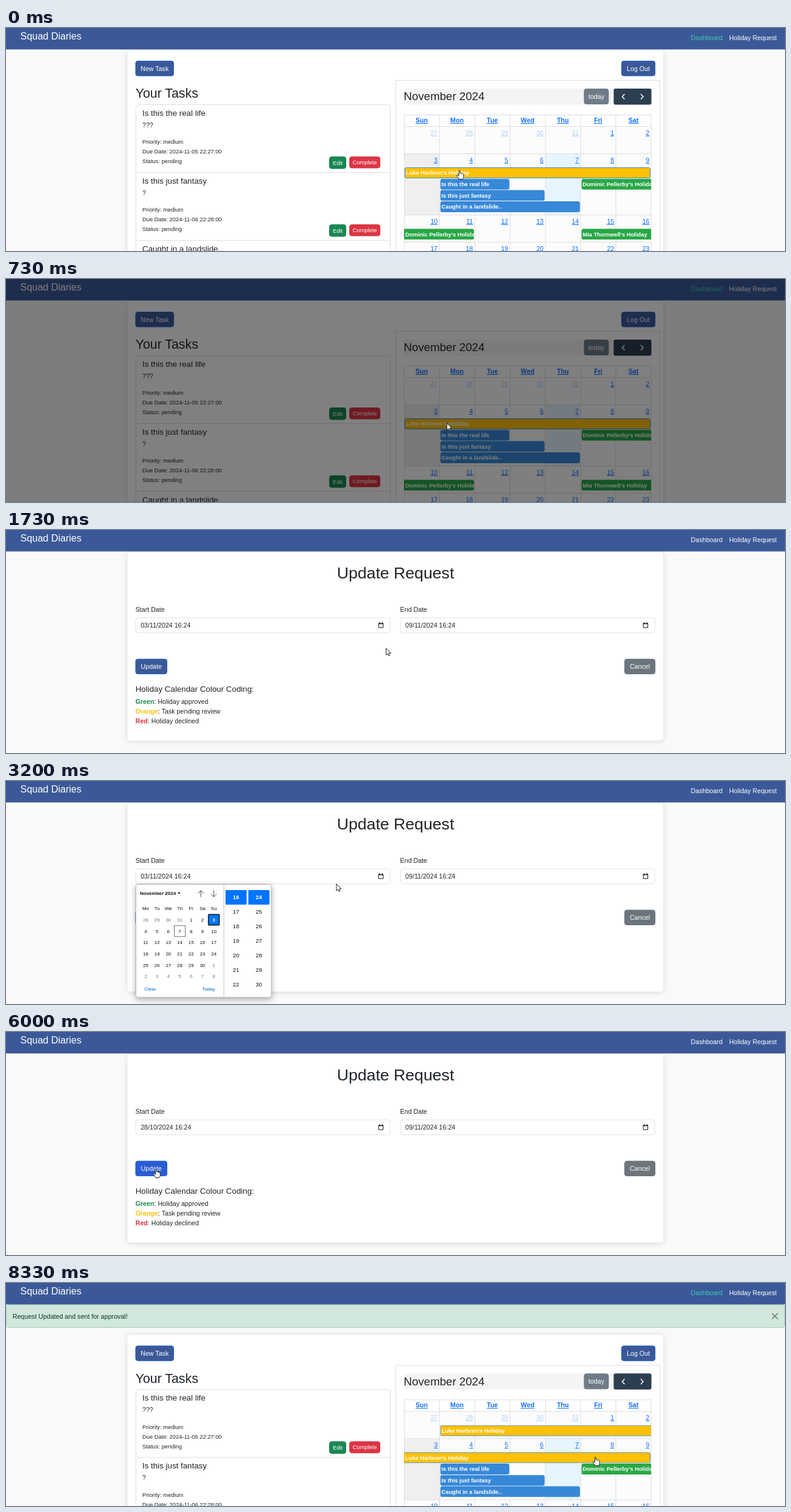
These frames come from a looping animation (1280x368 px, 9.4 s). An HTML page:

```html
<!DOCTYPE html>
<html lang="en">
<head>
<meta charset="utf-8">
<title>Holiday request</title>
<style>
html, body { margin: 0; width: 100%; height: 100%; overflow: hidden; background: #f9f9f9; }
svg { display: block; }
text { font-family: "Liberation Sans", Arial, sans-serif; white-space: pre; }
.b { font-weight: bold; }
.u { text-decoration: underline; }
.m { text-anchor: middle; }
.e { text-anchor: end; }
.card { filter: drop-shadow(0 1px 4px rgba(0, 0, 0, .14)); }
.pop { filter: drop-shadow(0 3px 5px rgba(0, 0, 0, .32)); }
</style>
</head>
<body>
<svg id="stage" width="100%" height="100%" viewBox="0 0 1280 368"></svg>
<script>
const LOOP = 9400, STEP = 200 / 3, SHIFT = 49.33;
const INK = '#212529', LINK = '#0d6efd', NAVY = '#3b5998';
const PEOPLE = ['Luke Harbren', 'Dominic Pellerby', 'Mia Thornwell'].map(n => n + "'s Holiday");
const TASKS = ['Is this the real life', 'Is this just fantasy', 'Caught in a landslide..'];

const text = (x, y, s, size = 10.67, fill = INK, cls = '', more = '') =>
  `<text x="${x}" y="${y}" font-size="${size}" fill="${fill}" class="${cls}" ${more}>${s}</text>`;
const rect = (x, y, w, h, fill, r = 0, more = '') =>
  `<rect x="${x}" y="${y}" width="${w}" height="${h}" rx="${r}" fill="${fill}" ${more}/>`;
const path = (d, stroke, width = 1, fill = 'none', more = '') =>
  `<path d="${d}" stroke="${stroke}" stroke-width="${width}" fill="${fill}" ${more}/>`;
const group = (id, body, more = '') => `<g id="${id}" ${more}>${body}</g>`;
const range = n => [...Array(n).keys()];

const button = (x, y, w, h, fill, label, size = 10.67, edge = fill, id = '') =>
  rect(x + .5, y + .5, w - 1, h - 1, fill, 3.5, `stroke="${edge}" ${id && `id="${id}"`}`) +
  text(x + w / 2, y + h / 2 + size * .36, label, size, '#fff', 'm');

// Calendar bar; open ends run past the clipped box so they stay square.
function bar(x1, x2, mid, fill, label, open = '', edge = fill) {
  const l = open.includes('l') ? -6 : .5, r = x2 - x1 + (open.includes('r') ? 6 : -.5);
  return `<svg x="${x1}" y="${mid - 9}" width="${x2 - x1}" height="18">` +
    rect(l, .5, r - l, 17, fill, 2.5, `stroke="${edge}"`) +
    text(2, 12.3, label, 9.33, '#fff', 'b') + '</svg>';
}

function task(title, i) {
  const y = 126.5 + i * 112;
  return path(`M213.5 ${y + 112}H631`, '#dedede') +
    text(224, y + 18.2, title, 13.33) +
    text(224, y + 37.6, i ? '?' : '???') +
    text(224, y + 64.8, 'Priority: medium', 9.33) +
    text(224, y + 80.8, `Due Date: 2024-11-0${5 + i} 22:2${7 + i}:00`, 9.33) +
    text(224, y + 96.8, 'Status: pending', 9.33) +
    button(531, y + 85.5, 28, 20.5, '#198754', 'Edit', 9.33) +
    button(564, y + 85.5, 51, 19.5, '#dc3545', 'Complete', 9.33);
}

function calendar() {
  const rows = [162.5, 207.5, 308.5, 353.5, 398.5];
  let s = rect(654, 163, 406, 240, '#fcfcfc') +
    rect(654, 208, 58, 100, '#efefef') + rect(886, 208, 58, 100, '#e6f5ff');
  s += path([143.5, ...rows].map(y => `M654 ${y}H1060`).join('') +
    range(8).map(i => `M${654.5 + i * 57.93} 143V420`).join(''), '#ddd');
  'Sun Mon Tue Wed Thu Fri Sat'.split(' ').forEach((d, i) =>
    s += text(683 + i * 58, 156, d, 10.67, LINK, 'b u m'));
  range(28).forEach(i => s += text(709.3 + i % 7 * 58, rows[i / 7 | 0] + 14.3,
    i < 5 ? 27 + i : i - 4, 10.67, LINK, 'u e', i < 5 ? 'opacity=".3"' : ''));
  const blue = '#3788d8', green = '#28a745', gold = '#ffc107';
  s += group('before', bar(655, 1059, 239, gold, PEOPLE[0], '', blue));
  s += group('after', bar(713.5, 1060, 194.3, gold, PEOPLE[0], 'r', blue) +
    bar(654, 1059, 239, gold, PEOPLE[0], 'l', blue));
  TASKS.forEach((t, i) => s += bar(713.5, 827 + i * 58, 257.7 + i * 18.67, blue, t));
  return s + bar(945.5, 1060, 257.7, green, PEOPLE[1], 'r') +
    bar(654, 769, 340.3, green, PEOPLE[1], 'l') +
    bar(945.5, 1060, 340.3, green, PEOPLE[2], 'r');
}

const dashboard = () =>
  rect(199.5, 36, 880.5, 420, '#fff', 5, 'class="card"') +
  button(212.5, 54, 63.5, 25.5, NAVY, 'New Task', 10.67, '#2064cf') +
  button(1011, 54, 56, 25.5, NAVY, 'Log Out', 10.67, '#2064cf') +
  text(212.7, 115.2, 'Your Tasks', 21.33) +
  rect(213.5, 126.5, 418, 400, '#fff', 4, 'stroke="#dedede"') +
  TASKS.map(task).join('') +
  rect(640.5, 86.5, 434, 400, '#fff', 0, 'stroke="#ddd"') +
  rect(654, 100, 406, 26.5, '#f4f4f4') +
  text(653.6, 119.4, 'November 2024', 18.67) +
  button(949.5, 100, 41, 26, '#6f7c88', 'today') +
  rect(998.5, 100, 62, 26.5, '#2c3e50', 3) +
  path('M1016.5 109l-4 4.3 4 4.3M1043 109l4 4.3-4 4.3', '#fff', 1.5) +
  calendar();

const field = (x, label, value, id) =>
  text(x, 134.8, label) +
  rect(x + .5, 145, 418, 24.7, '#fff', 4, 'stroke="#dee2e6"') +
  text(x + 8.5, 160.8, value, 10.67, INK, '', `id="${id}"`) +
  path(`M${x + 399.6} 154.5h7.4v6.6h-7.4z`, '#111', 1) +
  path(`M${x + 399.2} 154.6h8.2M${x + 401} 152.4v2M${x + 405.6} 152.4v2`, '#111', 1.5);

const legend = (y, name, fill, note) =>
  text(212.7, y, `<tspan class="b" fill="${fill}">${name}</tspan>: ${note}`);

// Month grid with weeks from Monday; lead = days shown from the month before.
function month(id, name, tipX, lead, prevLen, len, chosen, todayCell) {
  let s = text(220, 188, name, 8, '#101010', 'b') +
    path(`M${tipX} 184h4.6l-2.3 2.8z`, 'none', 0, '#101010');
  range(42).forEach(i => {
    const n = i - lead + 1, out = n < 1 || n > len;
    const x = 229.5 + i % 7 * 18.67, y = 229 + (i / 7 | 0) * 18.67, on = n === chosen;
    if (on) s += rect(x - 9, y - 8.8, 18, 17.6, '#0075ff', 1, 'stroke="#101010" stroke-width="1.4"');
    if (i === todayCell) s += rect(x - 9, y - 9, 18, 18, 'none', 0, 'stroke="#767676"');
    s += text(x, y + 2.9, n < 1 ? n + prevLen : out ? n - len : n, 8,
      on ? '#fff' : out ? '#757575' : '#101010', on ? 'm b' : 'm');
  });
  return group(id, s);
}

function picker() {
  let s = rect(213.5, 170.5, 222.5, 186.5, '#fff', 3, 'class="pop" stroke="#b5b5b5"') +
    path('M358 171V357', '#bfbfbf') +
    path('M320.2 191.5V181M315.5 185.6l4.7-4.7 4.7 4.7M341.4 180.5V191M336.7 186.4l4.7 4.7 4.7-4.7', '#333', .9);
  'Mo Tu We Th Fr Sa Su'.split(' ').forEach((d, i) =>
    s += text(229.5 + i * 18.67, 212.9, d, 8, '#101010', 'm'));
  s += text(227.5, 345.9, 'Clear', 8, '#0069d6') + text(343.5, 345.9, 'Today', 8, '#0069d6', 'e');
  [[378, 16], [415.5, 24]].forEach(([x, first]) => {
    s += rect(x - 17.3, 180, 34.7, 24, '#0075ff', 1);
    range(7).forEach(i => s += text(x, 195.4 + i * 24, first + i, 9.33,
      i ? '#101010' : '#fff', i ? 'm' : 'm b'));
  });
  return s + month('nov', 'November 2024', 282, 4, 31, 30, 3, 10) +
    month('oct', 'October 2024', 273.5, 1, 30, 31, 28, 38);
}

const form = () =>
  rect(199.5, 36, 880.5, 311.5, '#fff', 5, 'class="card"') +
  text(640, 79.5, 'Update Request', 26.67, INK, 'm') +
  field(212.7, 'Start Date', '', 'start') +
  field(647.6, 'End Date', '09/11/2024 16:24', 'end') +
  button(212.5, 212.5, 52.5, 25.5, NAVY, 'Update', 10.67, '#2064cf', 'update') +
  button(1016, 212.5, 51, 25.5, '#6c757d', 'Cancel') +
  text(212.7, 266.6, 'Holiday Calendar Colour Coding:', 13.33) +
  legend(286.8, 'Green', '#198754', 'Holiday approved') +
  legend(302.8, 'Orange', '#ffc107', 'Task pending review') +
  legend(318.8, 'Red', '#dc3545', 'Holiday declined') +
  group('picker', picker());

const notice = () =>
  rect(.5, 36, 1279, 37.5, '#d1e7dd', 4, 'stroke="#a3cfbb"') +
  text(10.7, 58.7, 'Request Updated and sent for approval!', 10.67, '#0a3622') +
  path('M1258.5 50l9.6 9.6m0-9.6l-9.6 9.6', '#000', 1.4, 'none', 'opacity=".5"');

const ARROW = 'M0 0V11.3L2.6 8.9L4.3 12.6L6 11.9L4.4 8.2H8Z';
const HAND = 'M-1 1C-1-.4 1-.4 1 1V5C1.6 4.3 2.8 4.5 3 5.4C3.8 4.8 4.8 5.1 5 6C5.8 5.6 6.8 6 6.8 7' +
  'V10.5C6.8 12.5 5.8 13 5.6 14.5H-.6C-1 12.6-3.2 11-4.2 8.8C-4.6 7.6-3 7-2.2 8L-1 9.3Z';

document.getElementById('stage').innerHTML =
  rect(0, 0, 1280, 368, '#f9f9f9') +
  group('home', dashboard()) + group('form', form()) + group('notice', notice()) +
  rect(0, 0, 1280, 35.4, NAVY) +
  text(23.5, 19.4, 'Squad Diaries', 16, '#fff') +
  text(1125.3, 20.2, 'Dashboard', 10.67, '#fff', '', 'id="dash"') +
  text(1188.3, 20.2, 'Holiday Request', 10.67, '#fff') +
  rect(0, 0, 1280, 368, '#000', 0, 'id="dim"') +
  path(ARROW, '#111', .9, '#fff', 'id="cursor" stroke-linejoin="round"');

const el = {};
document.querySelectorAll('[id]').forEach(n => el[n.id] = n);
const show = (id, on) => el[id].setAttribute('display', on ? 'inline' : 'none');
const clamp = v => Math.min(1, Math.max(0, v));
const mix = (a, b, k) => a + (b - a) * k;

// Pointer stops: time, x, y.
const STOPS = [
  [0, 745, 235], [67, 743, 236.5], [200, 743, 236.5], [400, 724.5, 238], [800, 724.5, 238],
  [1467, 624.5, 195], [1933, 624.5, 195], [2330, 598, 172], [2667, 613, 158], [3000, 613, 158],
  [3733, 229.5, 222.5], [4467, 229.5, 222.5], [5133, 493, 291], [5200, 493, 291],
  [6000, 246.5, 226], [6733, 246.5, 226], [7600, 703, 219], [8133, 930, 296], [8333, 968.5, 287],
  [LOOP, 968.5, 287]
];

function pointer(t) {
  const i = Math.max(1, STOPS.findIndex(s => s[0] >= t));
  const [t0, x0, y0] = STOPS[i - 1], [t1, x1, y1] = STOPS[i];
  const k = clamp((t - t0) / (t1 - t0)), e = k * k * (3 - 2 * k);
  return [mix(x0, x1, e), mix(y0, y1, e)];
}

function draw(ms) {
  const t = Math.floor((ms % LOOP + 3.4) / STEP) * STEP;
  const done = t > 6660, inForm = t > 1595 && !done;
  const [x, y] = pointer(t);

  show('home', !inForm);
  show('form', inForm);
  show('notice', done);
  show('before', !done);
  show('after', done);
  el.home.setAttribute('transform', `translate(0 ${done ? SHIFT : 0})`);
  el.dash.setAttribute('fill', inForm ? '#fff' : '#3fcbb9');
  el.dim.setAttribute('opacity', inForm || done ? 0 : .5 * clamp((t - 533.4) / 200));

  const picked = t > 3995;
  show('picker', t > 2860 && t < 4530);
  show('nov', !picked);
  show('oct', picked);
  el.start.textContent = (picked ? '28/10' : '03/11') + '/2024 16:24';

  const onUpdate = inForm && t > 5200 && x < 265 && y < 238;
  el.update.setAttribute('fill', !onUpdate ? NAVY : t > 6260 ? '#0a58ca' : '#2a5cd2');

  const onBar = done
    ? (x > 714 && y > 235 && y < 253) || (x > 654 && y > 279 && y < 297)
    : !inForm && t < 595;
  el.cursor.setAttribute('d', onBar || onUpdate ? HAND : ARROW);
  el.cursor.setAttribute('transform', `translate(${x.toFixed(2)} ${y.toFixed(2)})`);
}

const begin = performance.now();
function tick() {
  draw(performance.now() - begin);
  requestAnimationFrame(tick);
}
draw(0);
requestAnimationFrame(tick);
</script>
</body>
</html>
```
